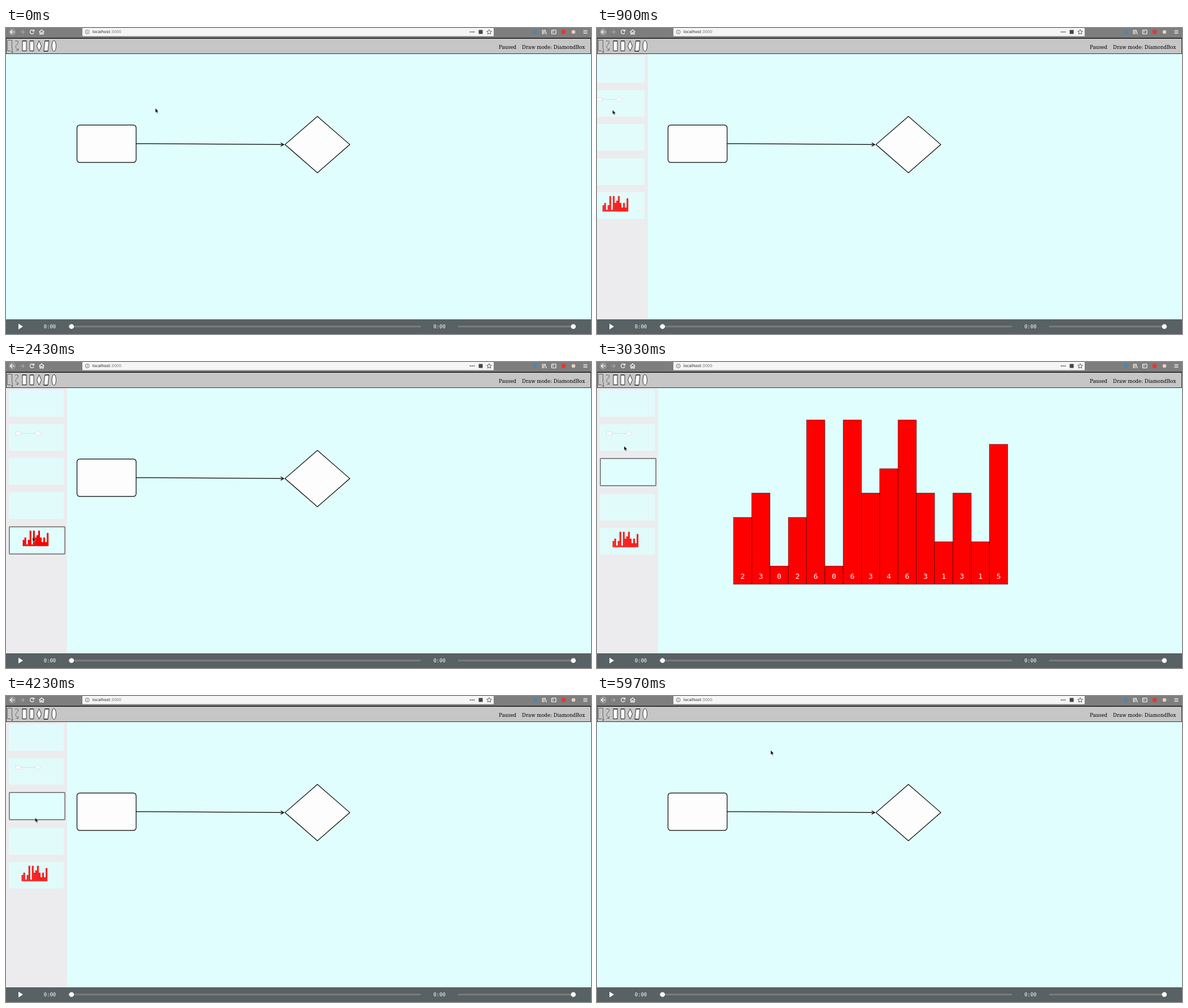
An HTML page that plays this animation: 1034x542 px, repeating every 6010 ms.

```html
<!DOCTYPE html>
<html lang="en">
<head>
<meta charset="utf-8">
<title>Diagram board</title>
<style>
  html, body { margin: 0; width: 100%; height: 100%; overflow: hidden; background: #e0fefe; }
  #stage { position: relative; width: 1034px; height: 542px; overflow: hidden; }
  .layer { position: absolute; left: 0; top: 0; display: block; }
  .serif { font: 8.62px "DejaVu Serif", serif; }
  .ui { font: 6.95px "DejaVu Sans", sans-serif; }
  .mono { font: 8.9px "DejaVu Sans Mono", monospace; fill: #fff; }
  #chart text { font: 12.92px "DejaVu Sans Mono", monospace; fill: #fff; text-anchor: middle; }

  .flow, .chart, .side, .thumb, .cursor { animation: 6010ms infinite; }
  .flow, .chart, .thumb { animation-timing-function: step-end; }
  .flow { animation-name: flow; }
  .chart { animation-name: chart; }
  @keyframes flow { 0%, 64.89% { visibility: visible } 43.26% { visibility: hidden } }
  @keyframes chart { 0%, 64.89% { visibility: hidden } 43.26% { visibility: visible } }

  .clip { position: absolute; left: 0; top: 46px; width: 1034px; height: 470px; overflow: hidden; }
  .side {
    box-sizing: border-box; width: 108px; height: 100%; padding: 4px 0 0 5px;
    background: #ececee; animation-name: slide; animation-timing-function: ease-in-out;
  }
  @keyframes slide {
    0%, 3.05%, 99.83%, 100% { transform: translateX(-108px) }
    19.68%, 83.19% { transform: none }
  }
  .thumb { width: 97px; height: 47px; margin-bottom: 13.2px; border-radius: 2px; background: #e0fefe; opacity: .87; }
  .thumb svg { display: block; width: 97px; height: 47px; }
  .t2 { animation-name: hover2; }
  .t3 { animation-name: hover3; }
  .t4 { animation-name: hover4; }
  .t5 { animation-name: hover5; }
  @keyframes hover2 {
    0%, 25.6%, 67.9% { padding: 0; width: 97px; box-shadow: none; opacity: .87 }
    21.8%, 50.7% { padding: 1.5px; width: 97px; box-shadow: inset 0 0 0 1.7px #777; opacity: 1 }
  }
  @keyframes hover3 {
    0%, 29%, 50.7%, 79.2% { padding: 0; box-shadow: none; opacity: .87 }
    25.6%, 47.8%, 67.9% { padding: 1.5px; box-shadow: inset 0 0 0 1.7px #777; opacity: 1 }
  }
  @keyframes hover4 {
    0%, 32%, 47.8% { padding: 0; box-shadow: none; opacity: .87 }
    29%, 46.2% { padding: 1.5px; box-shadow: inset 0 0 0 1.7px #777; opacity: 1 }
  }
  @keyframes hover5 {
    0%, 46.2% { padding: 0; box-shadow: none; opacity: .87 }
    32% { padding: 1.5px; box-shadow: inset 0 0 0 1.7px #777; opacity: 1 }
  }

  .cursor { animation-name: move; animation-timing-function: ease-in-out; }
  @keyframes move {
    0%, .5% { transform: translate(264px, 142px) }
    7.5%, 21.6% { transform: translate(27.5px, 145px) }
    36.6%, 43.6% { transform: translate(47px, 310px) }
    52.1%, 65.7% { transform: translate(48px, 135px) }
    70.7%, 76.5% { transform: translate(51.5px, 216px) }
    84%, 100% { transform: translate(307px, 96px) }
  }
</style>
</head>
<body>
<div id="stage">
  <svg class="layer" width="1034" height="542">
    <defs>
      <g id="flow" fill="#fdfdfd" stroke="#000" stroke-width="1.2">
        <rect x="125.5" y="171.8" width="104.5" height="66.4" rx="5"/>
        <path d="M230 204.8L491 206.4M485.5 203.3L491 206.4L485.5 209.4" fill="none"/>
        <path d="M493.2 206.4L550.4 156.6L607.6 206.4L550.4 256.4Z"/>
      </g>
      <g id="chart"></g>
    </defs>
    <g class="flow"><use href="#flow"/></g>
    <g class="chart"><use href="#chart"/></g>
  </svg>

  <div class="clip">
    <div class="side">
      <div class="thumb"></div>
      <div class="thumb t2"><svg viewBox="0 45 1034 471"><use href="#flow"/></svg></div>
      <div class="thumb t3"></div>
      <div class="thumb t4"></div>
      <div class="thumb t5"><svg viewBox="0 45 1034 471"><use href="#chart"/></svg></div>
    </div>
  </div>

  <svg class="layer" width="1034" height="542">
    <!-- browser bar -->
    <rect width="1034" height="18" fill="#7e7e7e"/>
    <rect x="135" width="727" height="14.5" rx="1" fill="#f5f5f5"/>
    <circle cx="11" cy="7" r="7.3" fill="#929292" stroke="#666" stroke-width=".6"/>
    <g fill="none" stroke="#fff" stroke-width="1.2">
      <path d="M15 7H7.5M11 3.5L7.5 7L11 10.5"/>
      <path d="M24.5 7H32M28.5 3.5L32 7L28.5 10.5" stroke="#aaa"/>
      <path d="M49 5A3.5 3.5 0 1 0 49.2 8.3M49.5 2.8V5.6H46.7"/>
      <path d="M58.5 7.2L63 3L67.5 7.2M60 6.5V10.8H62V8H64V10.8H66V6.5"/>
      <path d="M948.3 3V11M950.8 3V11M952.6 3.2L955 11"/>
      <rect x="964.5" y="3.5" width="7.5" height="7" rx="1"/>
      <path d="M966 5.5H968.5M966 7.5H968.5" stroke-width=".8"/>
      <path d="M1020.5 4.5H1027.5M1020.5 7H1027.5M1020.5 9.5H1027.5"/>
    </g>
    <g fill="none" stroke="#555" stroke-width=".8">
      <circle cx="143.7" cy="7" r="3.5"/>
      <path d="M143.7 6.4V9M143.7 4.7V5.6"/>
      <path d="M854 2.8L855.3 5.6L858.3 5.9L856 8L856.7 11L854 9.4L851.3 11L852 8L849.7 5.9L852.7 5.6Z" stroke="#333"/>
    </g>
    <g fill="#444">
      <circle cx="820.8" cy="7" r="1.1"/><circle cx="824" cy="7" r="1.1"/><circle cx="827.2" cy="7" r="1.1"/>
      <rect x="835.5" y="3.5" width="7" height="7"/>
    </g>
    <circle cx="935" cy="7" r="3.4" fill="#4488b8"/>
    <circle cx="985.5" cy="7" r="4" fill="#e23a30"/>
    <circle cx="1003" cy="7" r="3.3" fill="#e8d0c0"/>
    <text class="ui" x="152.8" y="9.4" fill="#222">localhost<tspan fill="#777">:3000</tspan></text>

    <!-- drawing tools -->
    <rect x=".5" y="18.5" width="1033" height="27" fill="#c6c6c6" stroke="#333"/>
    <path d="M0 18.2H1034" stroke="#111" stroke-width="1.2"/>
    <g fill="none" stroke="#444" stroke-width=".8">
      <path d="M10.5 36V21.5H2.5V40.5H8M11 36V43.5M9 41.5L11 44L12.5 41.5"/>
      <path d="M16 23.5C22 21 23 25 19.5 29S16 34 20.5 38M17.5 39.5H21.5V36"/>
    </g>
    <g fill="#fdfdfd" stroke="#222" stroke-width=".9">
      <rect x="29" y="23" width="7" height="17.5"/>
      <rect x="42" y="23" width="7" height="17.5" rx="1.2"/>
      <path d="M58.5 22.5L62.5 32L58.5 41L54.5 32Z"/>
      <path d="M68.8 23H76L74 41H66.8Z"/>
      <ellipse cx="84.8" cy="31.8" rx="3.7" ry="9.5"/>
    </g>
    <path d="M29 23H36M29 40.5H36M42 23H49M42 40.5H49M68.8 23H76M66.8 41H74" stroke="#111" stroke-width="1.2"/>
    <text class="serif" x="871" y="37.3">Paused</text>
    <text class="serif" x="912" y="37.3">Draw mode: DiamondBox</text>

    <!-- player -->
    <rect y="516" width="1034" height="26" fill="#586163"/>
    <path d="M111 528.8H732M800 528.8H1003" stroke="#7c7c7a" stroke-width="3" stroke-linecap="round"/>
    <g fill="#fff">
      <path d="M22 523.7L30 528.8L22 534Z"/>
      <circle cx="115.8" cy="528.7" r="4.3"/>
      <circle cx="1002.8" cy="528.7" r="4.3"/>
    </g>
    <text class="mono" x="66.8" y="531.8">0:00</text>
    <text class="mono" x="755.4" y="531.8">0:00</text>

    <g class="cursor">
      <path d="M0 0V8L1.9 6.4L3.2 9.2L4.5 8.6L3.2 5.9H5.6Z" fill="#000" stroke="#fff" stroke-width=".5"/>
    </g>
  </svg>
</div>
<script>
  const NS = "http://www.w3.org/2000/svg";
  const chart = document.getElementById("chart");

  function add(tag, attrs, text = "") {
    const el = document.createElementNS(NS, tag);
    for (const key in attrs) el.setAttribute(key, attrs[key]);
    el.textContent = text;
    chart.append(el);
  }

  const left = 241.2, base = 393.7, step = 32.32;
  [..."230260634631315"].forEach((digit, i) => {
    const x = left + i * step, height = 32.3 + 43.1 * digit;
    add("rect", { x, y: base - height, width: step, height, fill: "#f00", stroke: "#300", "stroke-width": .6 });
    add("text", { x: x + step / 2, y: 384 }, digit);
  });
</script>
</body>
</html>
```
